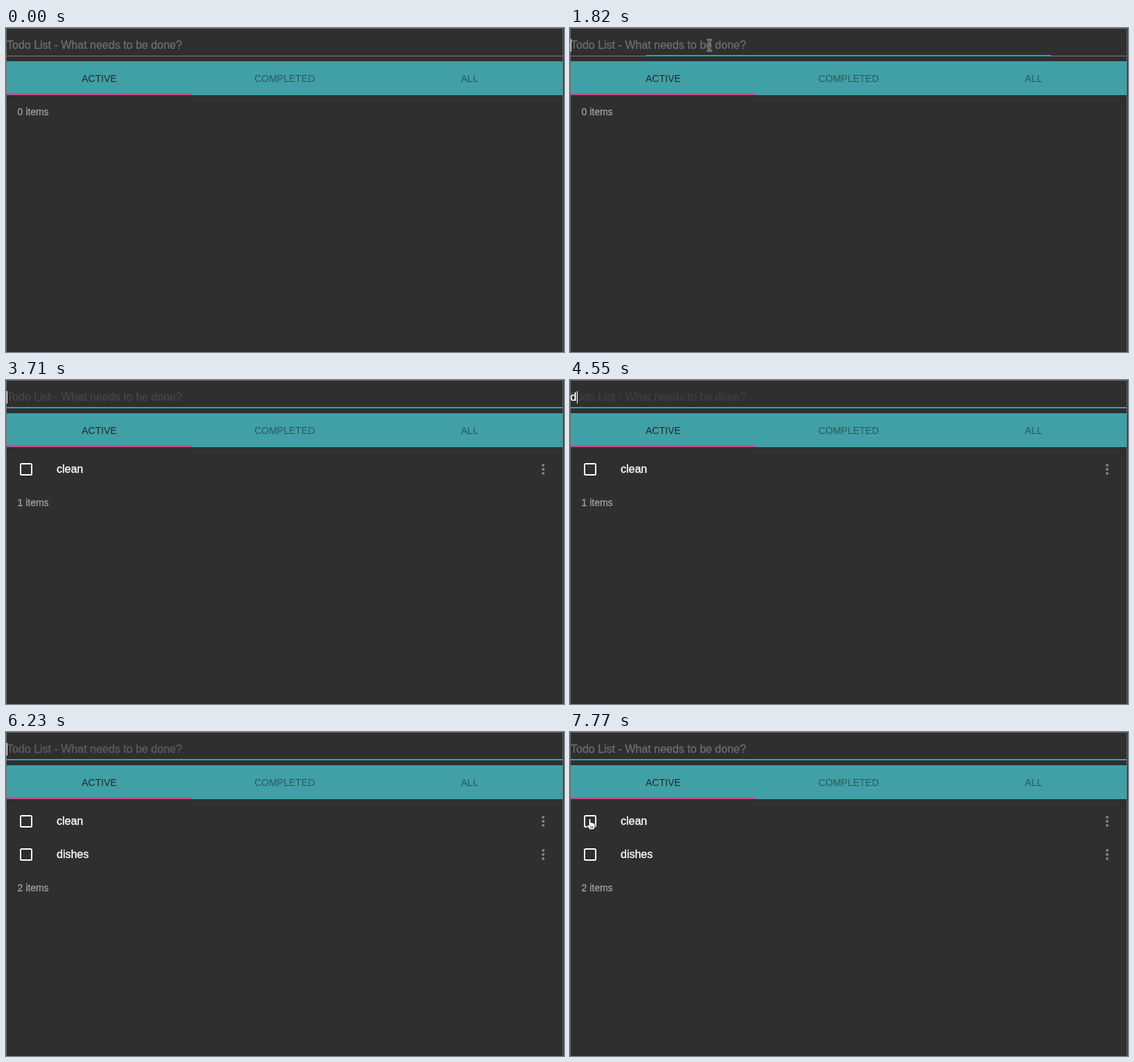
Animation of 804 by 468 pixels, one loop 8000 ms. Source, as an HTML page:

```html
<!DOCTYPE html>
<html lang="en">
<head>
<meta charset="utf-8">
<title>Todo list</title>
<style>
  html, body { margin: 0; width: 100%; height: 100%; overflow: hidden; background: #2f2f2f; }
  svg { display: block; width: 804px; height: 468px; }
  text { font: 16px "Liberation Sans", Arial, sans-serif; white-space: pre; }
  .tab { font-size: 14px; text-anchor: middle; fill: #275b5f; }
  .tab.active { fill: #1c2c2e; }
  .bright { fill: #fff; stroke: #fff; stroke-width: .35; }
  #hint { fill: #6e6e6e; stroke: #6e6e6e; stroke-width: .3; }
  #count { font-size: 14px; fill: #a0a0a0; stroke: #a0a0a0; stroke-width: .3; }
</style>
</head>
<body>
<svg viewBox="0 0 804 468">
  <defs>
    <g id="row">
      <rect x="21" y="121" width="16" height="16" rx="1.5" fill="none" stroke="#fff" stroke-width="2"/>
      <g fill="#828282">
        <circle cx="774" cy="123" r="2"/><circle cx="774" cy="129" r="2"/><circle cx="774" cy="135" r="2"/>
      </g>
    </g>
  </defs>
  <rect width="804" height="468" fill="#2f2f2f"/>
  <path d="M0 40.5H802" stroke="#7c7c7c"/>
  <rect id="focus" y="39" height="2" fill="#32a4ab"/>
  <rect y="48" width="802" height="49" fill="#40a0a6"/>
  <rect y="94.5" width="267" height="2.5" fill="#b9528f"/>
  <path d="M0 .5H803M.5 0V468M802.5 0V468" fill="none" stroke="#6c6c6c"/>
  <text class="tab active" x="134.3" y="78">ACTIVE</text>
  <text class="tab" x="401.5" y="78">COMPLETED</text>
  <text class="tab" x="668" y="78">ALL</text>

  <text id="hint" x="1" y="30">Todo List - What needs to be done?</text>
  <text id="typed" class="bright" x=".5" y="30"></text>
  <rect id="caret" y="16" width="1" height="18" fill="#fff"/>

  <g id="item0"><use href="#row"/><text class="bright" x="73" y="134">clean</text></g>
  <g id="item1"><use href="#row" y="48"/><text class="bright" x="73" y="182">dishes</text></g>
  <text id="count" x="16.5"></text>

  <g id="ring" fill="none">
    <circle r="19.5" stroke="#fff" stroke-width="6"/>
    <circle r="19.5" stroke="#000" stroke-width="3.4"/>
  </g>
  <path id="arrow" d="M0 0V13L3 10.2 5.2 15.3 7.5 14.3 5.4 9.3H9Z" fill="#000" stroke="#fff"/>
  <g id="beam" fill="none">
    <path id="stem" d="M-3.5-8Q0-8 0-6Q0-8 3.5-8M0-6V6M-3.5 8Q0 8 0 6Q0 8 3.5 8M-2 3H2" stroke="#a8a8a8" stroke-width="2.4"/>
    <use href="#stem" style="stroke:#222"/>
    <path d="M-3.5-8Q0-8 0-6Q0-8 3.5-8M0-6V6M-3.5 8Q0 8 0 6Q0 8 3.5 8M-2 3H2" stroke="#222" stroke-width=".9"/>
  </g>
  <path id="hand" d="M-2-4Q-2-6 -.5-6Q1-6 1-4V0Q3-1 3.5 .5Q5-.5 5.5 1Q7 .5 7 2.5V6L5.5 10H-1L-4.5 4.5Q-5 2.5-3.5 3L-2 4.5ZM1.2 5V8M3.4 5V8" fill="#fff" stroke="#111" stroke-width=".9"/>
</svg>
<script>
const LOOP = 8000, TICK = 70, BLINK = 490, FADE = 450, FOCUS = 1717;
const el = id => document.getElementById(id);
const show = (id, on) => el(id).style.display = on ? '' : 'none';
const easeOut = f => 1 - (1 - Math.min(1, Math.max(0, f))) ** 5;

// [time, text in the input]
const typing = [
  [1750, ''], [2520, 'c'], [2800, 'cl'], [2940, 'cle'], [3150, 'clea'], [3290, 'clean'],
  [3710, ''], [4480, 'd'], [4830, 'di'], [4970, 'dis'], [5180, 'dish'], [5670, 'dishe'],
  [5880, 'dishes'], [6160, '']
];
// Times at which the hint turns off and on
const hintFlips = [2520, 3710, 4480, 6160];

// Pointer tracks: kind, end time, points of [time, x, y]
const tracks = [
  ['arrow', 490, [[280, 385, 445], [350, 312, 220], [420, 230, 12]]],
  ['arrow', 1400, [[770, 208.5, 24.5]]],
  ['beam', 2520, [[1540, 201, 25]]],
  ['beam', 6930, [[6580, 201, 25], [6790, 190, 17], [6930, 164, 46]]],
  ['hand', LOOP, [[6930, 164, 58], [7210, 80, 148], [7350, 46, 158], [7560, 33, 140], [7700, 29, 131]]]
];
// Pressed mouse: start, end, x, y, size
const clicks = [[770, 1190, 209, 26, 1], [1540, 1750, 201, 25, .8]];

function along(points, t) {
  const next = points.findIndex(p => p[0] > t);
  if (next < 0) return points.at(-1).slice(1);
  const [a, b] = [points[next - 1], points[next]];
  const f = (t - a[0]) / (b[0] - a[0]);
  return [a[1] + (b[1] - a[1]) * f, a[2] + (b[2] - a[2]) * f];
}

function drawInput(t) {
  const last = typing.findLast(e => e[0] <= t);
  el('typed').textContent = last ? last[1] : '';
  const width = last && last[1] ? el('typed').getComputedTextLength() : 0;
  el('caret').setAttribute('x', 1 + Math.round(width));
  show('caret', last && Math.floor((t - last[0]) / BLINK) % 2 === 0);

  const flips = hintFlips.filter(f => f <= t);
  const fade = flips.length ? easeOut((t - flips.at(-1) + 38) / FADE) : 1;
  el('hint').setAttribute('opacity', flips.length % 2 ? 1 - fade : fade);

  const half = 401 * easeOut((t - FOCUS) / FADE);
  el('focus').setAttribute('x', 401.5 - half);
  el('focus').setAttribute('width', half * 2);
}

function drawList(t) {
  const count = (t >= 3710) + (t >= 6160);
  show('item0', count > 0);
  show('item1', count > 1);
  el('count').textContent = count + ' items';
  el('count').setAttribute('y', [126, 182, 230][count]);
}

function drawPointer(t) {
  const track = tracks.find(([, end, points]) => t >= points[0][0] && t < end);
  for (const kind of ['arrow', 'beam', 'hand']) show(kind, track && track[0] === kind);
  if (track) el(track[0]).setAttribute('transform', `translate(${along(track[2], t)})`);

  const click = clicks.find(c => t >= c[0] && t < c[1]);
  show('ring', click);
  if (click) {
    const [start, , x, y, size] = click;
    const scale = size * Math.min(1, .4 + (t - start) / 230);
    el('ring').setAttribute('transform', `translate(${x} ${y}) scale(${scale})`);
  }
}

function frame(now) {
  const t = Math.floor(now % LOOP / TICK) * TICK;
  drawInput(t);
  drawList(t);
  drawPointer(t);
  requestAnimationFrame(frame);
}
requestAnimationFrame(frame);
</script>
</body>
</html>
```
